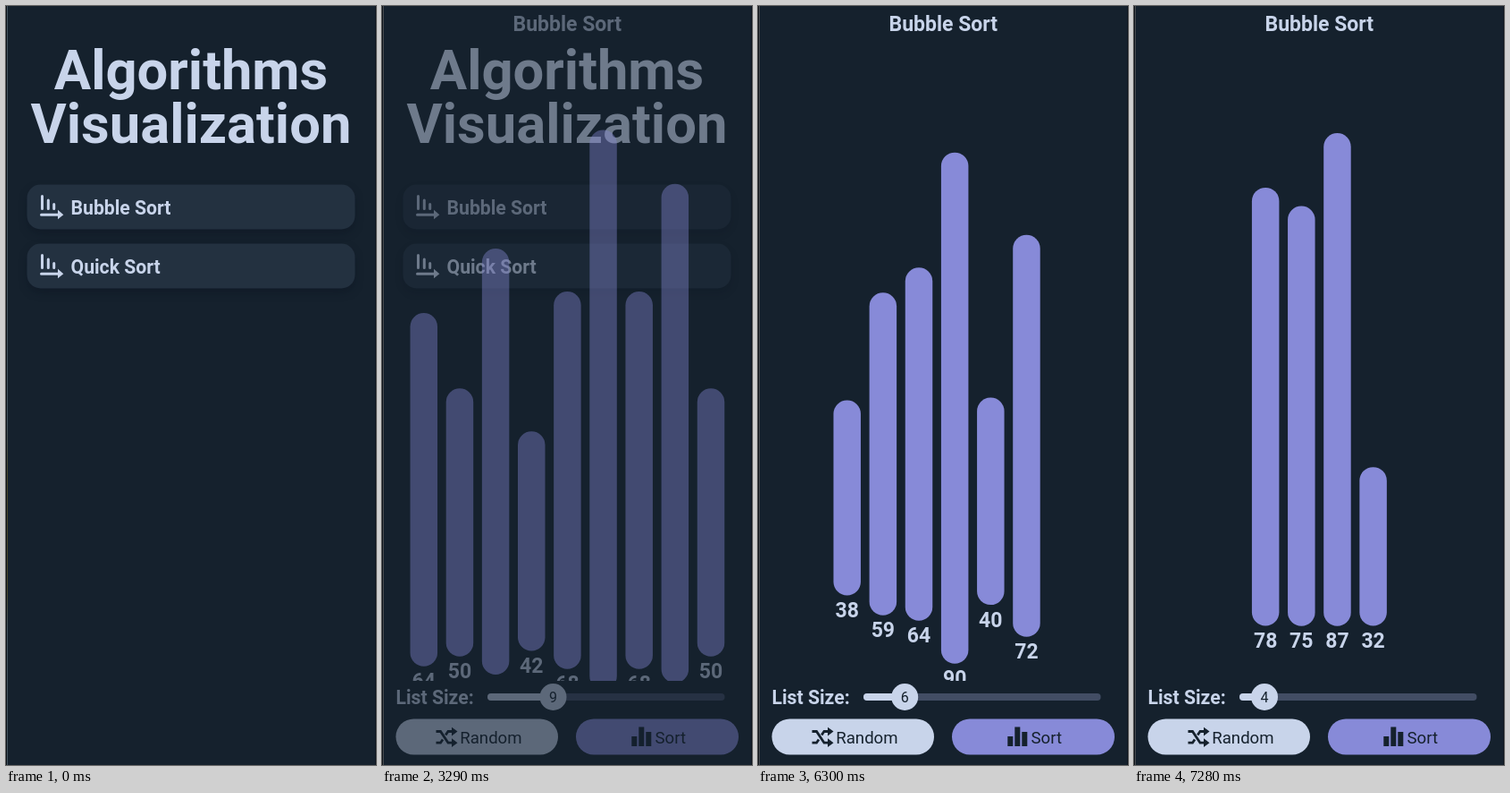
Write an HTML page that moves like this. It is 414x848 px and loops after 8000 ms.

```html
<!DOCTYPE html>
<html lang="en">
<head>
<meta charset="utf-8">
<title>Algorithms Visualization</title>
<style>
  html, body { margin: 0; width: 100%; height: 100%; overflow: hidden; background: #15212d; }
  svg { display: block; width: 100%; height: 100%; font-family: Roboto, sans-serif; }
  text { font-weight: 700; fill: #c8d4ea; }
  .mid { text-anchor: middle; }
  .title { font-size: 61.5px; }
  .item { font-size: 21.2px; }
  .label { font-size: 23px; }
  .button { font-size: 18.6px; font-weight: 400; fill: #15212d; }
  .size { font-size: 16px; font-weight: 400; fill: #15212d; }
  .card { fill: #233140; filter: drop-shadow(0 5px 5px rgba(5, 10, 25, .28)); }
  .light { fill: #c8d4ea; }
  .accent { fill: #878ad8; }
  .line { fill: none; stroke: #c8d4ea; stroke-width: 3; stroke-linecap: round; }
  .shuffle { fill: none; stroke: #15212d; stroke-width: 2.8; }
  .dark { fill: #15212d; }
</style>
</head>
<body>
<svg viewBox="0 0 414 848" preserveAspectRatio="none">
  <defs>
    <clipPath id="listArea"><rect width="414" height="753.5"/></clipPath>
    <linearGradient id="edgeTint" x2="0" y2="1">
      <stop offset="0" stop-color="#465560"/>
      <stop offset=".55" stop-color="#465560"/>
      <stop offset=".62" stop-color="#4c4a2c"/>
      <stop offset=".77" stop-color="#4c4a2c"/>
      <stop offset=".82" stop-color="#465560"/>
    </linearGradient>
    <g id="sortIcon">
      <path class="line" d="M40.5 212.5V226.5M47.3 217V226.5M53.7 221.5V226.5M39.5 233.3H59"/>
      <path class="light" d="M58 227.8L64.3 233.3L58 238.2Z"/>
    </g>
  </defs>
  <rect width="414" height="848" fill="#15212d"/>

  <g id="home">
    <text class="title mid" x="207" y="92.5">Algorithms</text>
    <text class="title mid" x="207" y="153">Visualization</text>
    <g id="pressed">
      <rect class="card" x="23.5" y="199.5" width="367" height="50" rx="15"/>
      <use href="#sortIcon"/>
      <text class="item" x="72.5" y="233">Bubble Sort</text>
    </g>
    <rect class="card" x="23.5" y="265.5" width="367" height="50" rx="15"/>
    <use href="#sortIcon" y="66"/>
    <text class="item" x="72.5" y="299.3">Quick Sort</text>
  </g>

  <g id="sorter">
    <text class="label mid" x="207.3" y="28.3">Bubble Sort</text>
    <g id="bars" clip-path="url(#listArea)"></g>
    <text class="item" x="15.5" y="780">List Size:</text>
    <rect x="118" y="768" width="265.5" height="8" rx="4" fill="#424d64"/>
    <rect id="filled" class="light" x="118" y="768" height="8" rx="4"/>
    <g id="thumb">
      <circle class="light" cy="772" r="15"/>
      <text id="size" class="size mid" y="778"></text>
    </g>
    <rect class="light" x="15.5" y="796.5" width="181.5" height="40" rx="20"/>
    <path class="shuffle" d="M60.5 810.5H65.5L74 823.2H79M60.5 823.2H65.5L68 819.5M71.2 814.5L74 810.5H79"/>
    <path class="dark" d="M78 805.8L84.5 810.5L78 815.5ZM78 818.2L84.5 823.2L78 828Z"/>
    <text class="button" x="87.3" y="823.5">Random</text>
    <rect class="accent" x="217" y="796.5" width="182" height="40" rx="20"/>
    <path class="dark" d="M279.3 816H285.3V827H279.3ZM287.3 805.5H293.3V827H287.3ZM295.3 811H301.3V827H295.3Z"/>
    <text class="button" x="305.5" y="823.5">Sort</text>
  </g>

  <rect width="1" height="848" fill="#0a1017"/>
  <rect id="edge" x="1" width="1" height="848"/>
  <rect x="413" width="1" height="848" fill="#0d151e"/>
</svg>
<script>
const LOOP = 8000, TICK = 70;
const FLOOR = 692.5, CENTER = 207.4, PITCH = 40.15, WIDTH = 30.5;

// Each list appears at a time and glides from where the bars were.
const lists = [
  { at: 3104, values: [64, 50, 76, 42, 68, 98, 68, 88, 50] },
  { at: 6006, values: [87, 73, 94, 56, 40, 52, 50, 32] },
  { at: 6076, values: [52, 81, 47, 70, 61, 38, 90] },
  { at: 6146, values: [38, 59, 64, 90, 40, 72] },
  { at: 6405, values: [74, 42, 45, 45, 98] },
  { at: 6800, values: [78, 75, 87, 32] }
];

const $ = id => document.getElementById(id);
const clamp = v => Math.min(1, Math.max(0, v));
const mix = (a, b, p) => a + (b - a) * p;
const heightOf = value => value * 6.79 - 40;
const centerOf = (i, count) => CENTER + (i - (count - 1) / 2) * PITCH;

// Critically damped spring
function settle(ms) {
  const s = Math.max(0, ms) * .02;
  return 1 - Math.exp(-s) * (1 + s);
}

function add(parent, tag, attrs) {
  const el = document.createElementNS('http://www.w3.org/2000/svg', tag);
  for (const key in attrs) el.setAttribute(key, attrs[key]);
  return parent.appendChild(el);
}

const columns = lists[0].values.map(() => {
  const group = add($('bars'), 'g', {});
  return {
    group,
    bar: add(group, 'rect', { class: 'accent', x: -WIDTH / 2, width: WIDTH, rx: WIDTH / 2 }),
    label: add(group, 'text', { class: 'label mid' })
  };
});

function barsAt(t) {
  const count = lists[0].values.length;
  let bars = lists[0].values.map((value, i) => ({ value, x: centerOf(i, count), top: FLOOR }));
  lists.forEach(({ at, values }, k) => {
    if (k && t < at) return;
    const end = k + 1 < lists.length ? Math.min(t, lists[k + 1].at) : t;
    const p = settle(end - at);
    bars = values.map((value, i) => ({
      value,
      x: mix(bars[i].x, centerOf(i, values.length), p),
      top: mix(bars[i].top, FLOOR - heightOf(value), p)
    }));
  });
  return bars;
}

function draw(t) {
  const shown = clamp((t - 3100) / 475);
  $('sorter').style.opacity = shown;
  $('home').style.opacity = clamp(1 - shown * 1.25);
  $('pressed').style.opacity = t < 3150 ? 1 - .45 * clamp((t - 3040) / 110) : mix(.55, 1, clamp((t - 3150) / 250));
  $('edge').setAttribute('fill', t < 1330 ? 'url(#edgeTint)' : '#4a4d50');

  const bars = barsAt(t);
  columns.forEach(({ group, bar, label }, i) => {
    const b = bars[i];
    group.style.display = b ? '' : 'none';
    if (!b) return;
    const h = heightOf(b.value);
    group.setAttribute('transform', `translate(${b.x} ${b.top})`);
    bar.setAttribute('height', h);
    label.setAttribute('y', h + 24.7);
    label.textContent = b.value;
  });

  const knob = 146 + (bars.length - 4) * 9.1;
  $('thumb').setAttribute('transform', `translate(${knob} 0)`);
  $('filled').setAttribute('width', knob - 118);
  $('size').textContent = bars.length;
}

const start = performance.now();
function frame() {
  const t = (performance.now() - start) % LOOP;
  draw(Math.floor(t / TICK) * TICK);
  requestAnimationFrame(frame);
}
frame();
</script>
</body>
</html>
```
